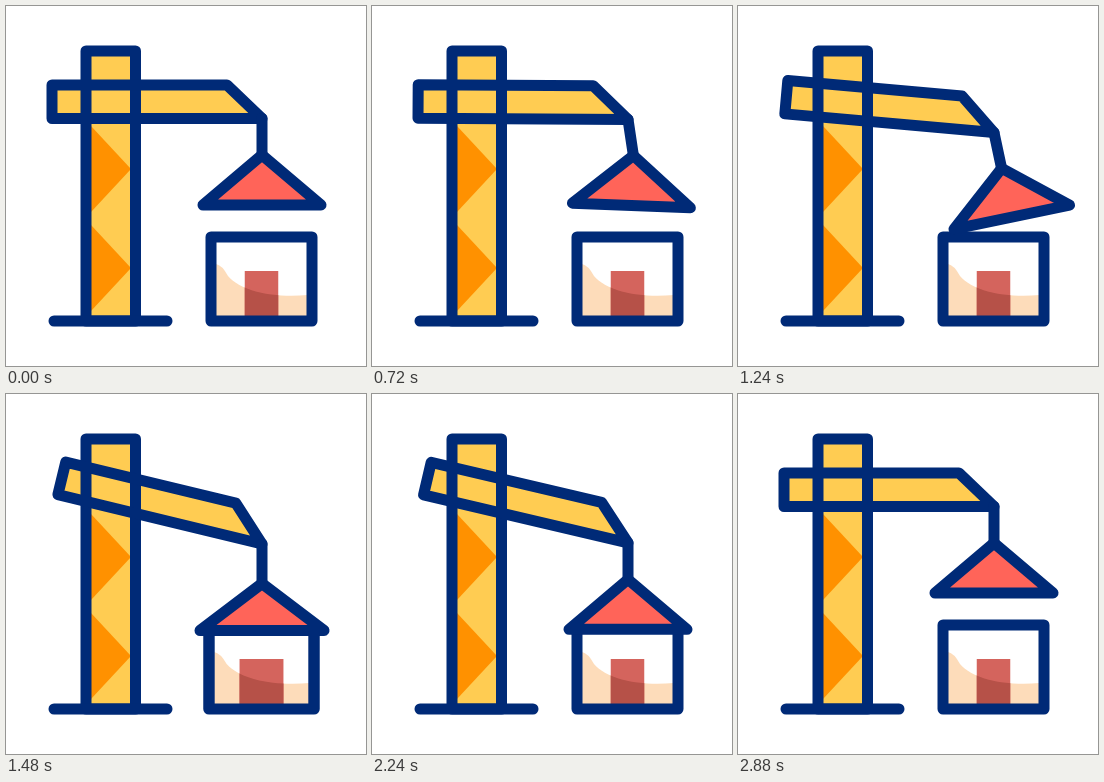
These frames come from a looping animation (360x360 px, 3 s). An HTML page with a canvas:

```html
<!DOCTYPE html>
<html lang="en">
<head>
<meta charset="utf-8">
<title>Crane building a house</title>
<style>
  html, body { margin: 0; width: 360px; height: 360px; overflow: hidden; background: #fff; }
  canvas { display: block; }
</style>
</head>
<body>
<canvas id="stage" width="360" height="360"></canvas>
<script>
const ctx = document.getElementById('stage').getContext('2d');
const LOOP = 3000, STEP = 40, RAD = Math.PI / 180;
const NAVY = '#002a77', YELLOW = '#ffcc52', ORANGE = '#ff9100', RED = '#ff6459';
const PEACH = '#fddcba', DOOR = '#d4645d', DOOR_SHADE = '#b65148';

// Tracks: [time, value, optional time exponent for the ease into this key]
const LOWER = [[120, 0], [440, .25], [1040, -.25], [1440, 1], [2200, 1], [2880, 0, .8]];
const SWING = [[120, 0], [360, -10], [1040, 24], [1440, 0]];
const TILT = [[120, 0], [520, -15], [1040, 23.5], [1440, 0]];
const SQUASH = [[1400, 0], [1480, 1], [1600, -.3], [1800, 0]];

function valueAt(track, t) {
  if (t <= track[0][0]) return track[0][1];
  for (let i = 1; i < track.length; i++) {
    const [t0, a] = track[i - 1], [t1, b, power = 1] = track[i];
    if (t < t1) {
      const p = ((t - t0) / (t1 - t0)) ** power;
      return a + (b - a) * p * p * (3 - 2 * p);
    }
  }
  return track[track.length - 1][1];
}

function polygon(...points) {
  const path = new Path2D();
  points.forEach(([x, y]) => path.lineTo(x, y));
  path.closePath();
  return path;
}

function rect(x, y, w, h) {
  return polygon([x, y], [x + w, y], [x + w, y + h], [x, y + h]);
}

function fill(path, color) {
  ctx.fillStyle = color;
  ctx.fill(path);
}

function line(x1, y1, x2, y2) {
  ctx.beginPath();
  ctx.moveTo(x1, y1);
  ctx.lineTo(x2, y2);
  ctx.stroke();
}

const mast = rect(80, 45, 49.5, 270);
const jib = polygon([-210, -33.5], [-35, -33.5], [0, 0], [-210, 0]);
const braces = [120, 219].map(y => polygon([85, y], [125, y + 43], [85, y + 86]));
const walls = rect(205, 231, 101, 84);
const shade = new Path2D('M210 258 Q216 259 222 270 C236 286 268 292 302 289 V310 H210 Z');

function drawHouse(squash) {
  const doorWidth = 33.5 * (1 + .26 * squash);
  const door = rect(255.5 - doorWidth / 2, 265, doorWidth, 45);
  ctx.save();
  ctx.translate(255.5, 0);
  ctx.scale(1 + .04 * squash, 1);
  ctx.translate(-255.5, 0);
  fill(walls, '#fff');
  fill(shade, PEACH);
  fill(door, DOOR);
  ctx.save();
  ctx.clip(door);
  fill(shade, DOOR_SHADE);
  ctx.restore();
  ctx.stroke(walls);
  ctx.restore();
}

function drawCrane(tipY, angle) {
  const placeJib = paint => {
    ctx.save();
    ctx.translate(256, tipY);
    ctx.rotate(angle);
    paint();
    ctx.restore();
  };
  placeJib(() => fill(jib, YELLOW));
  fill(mast, YELLOW);
  braces.forEach(brace => fill(brace, ORANGE));
  ctx.stroke(mast);
  placeJib(() => ctx.stroke(jib));
  line(48, 315, 161, 315);
}

function drawRoof(tipY, swing, tilt, squash) {
  const x = 256 + 36.5 * Math.sin(swing);
  const y = tipY + 36.5 * Math.cos(swing) + 3 * squash;
  const half = 59 + 3 * squash, height = 50 - 3 * squash;
  const roof = polygon([0, 0], [half, height], [-half, height]);
  line(256, tipY, x, y);
  ctx.save();
  ctx.translate(x, y);
  ctx.rotate(-tilt);
  fill(roof, RED);
  ctx.stroke(roof);
  ctx.restore();
}

function draw(t) {
  const lower = valueAt(LOWER, t), squash = valueAt(SQUASH, t);
  const tipY = 112.5 + 37.5 * lower;
  ctx.clearRect(0, 0, 360, 360);
  ctx.strokeStyle = NAVY;
  ctx.lineWidth = 11;
  ctx.lineCap = ctx.lineJoin = 'round';
  drawHouse(squash);
  drawCrane(tipY, 13.6 * lower * RAD);
  drawRoof(tipY, valueAt(SWING, t) * RAD, valueAt(TILT, t) * RAD, squash);
}

const start = performance.now();
function tick() {
  const t = (performance.now() - start) % LOOP;
  draw(Math.floor(t / STEP) * STEP);
  requestAnimationFrame(tick);
}
tick();
</script>
</body>
</html>
```
